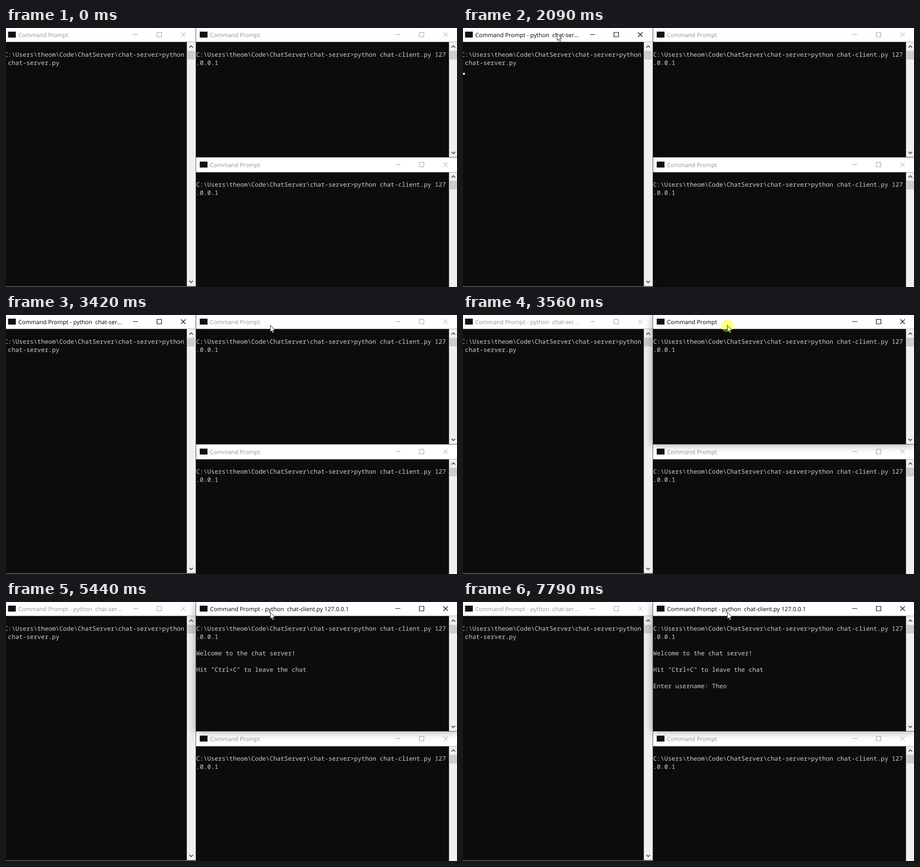
Recreate the animation shown at these times as an HTML page. Size 987x568 px, loop 8 s.

```html
<!DOCTYPE html>
<html lang="en">
<head>
<meta charset="utf-8">
<title>Chat server demo</title>
<style>
  html, body { margin: 0; width: 100%; height: 100%; overflow: hidden; }
  #scene { position: fixed; left: 0; top: 0; width: 100%; height: 100%; overflow: hidden; contain: strict; background: #505050; }
  svg { position: absolute; left: 0; top: 0; display: block; }
  text { white-space: pre; text-rendering: geometricPrecision; }
  .term { font: 500 13.4px "Noto Sans Mono", monospace; fill: #d0d0d0; }
  .title { font: 12.7px "Open Sans", sans-serif; fill: #939393; }
  .buttons { fill: none; stroke: #999; stroke-width: 1; }
  .active .title { fill: #000; }
  .active .buttons { stroke: #000; stroke-width: 1.2; }
  .chevron { fill: none; stroke: #505050; stroke-width: 1.8; }
  .shade { position: absolute; }
  #leftShade { left: 0; top: 0; width: 415px; height: 568px; box-shadow: 0 0 18px rgba(0, 0, 0, .15); }
  #topShade { left: 415px; top: 0; width: 572px; height: 284px; box-shadow: 0 1px 18px rgba(0, 0, 0, .35); }
</style>
</head>
<body>
<div id="scene">
  <svg id="stage" width="987" height="568"></svg>
  <div class="shade" id="leftShade"></div>
  <div class="shade" id="topShade"></div>
  <svg id="pointer" width="987" height="568">
    <g id="click">
      <circle r="13.5"/>
      <path id="clickDark" d="M-11.2 7.5A13.5 13.5 0 0 0 11.2 7.5Z" fill="#2f861c"/>
    </g>
    <path id="arrow" d="M.5 .5V15.6L3.9 12.3 6.2 17.8 8.5 16.8 6.3 11.4H10.8Z" fill="#fff" stroke="#000" stroke-width=".9" stroke-linejoin="round"/>
  </svg>
</div>
<script>
const LOOP = 8000, CELL = 8.04, ROW = 18;
const PROMPT = 'C:\\Users\\theom\\Code\\ChatServer\\chat-server>python';
const $ = id => document.getElementById(id);

const rect = (x, y, w, h, fill) =>
  `<rect x="${x}" y="${y}" width="${w}" height="${h}" fill="${fill}"/>`;
const chevron = (x, y, dir) =>
  `<path class="chevron" d="M${x - 4} ${y + 2 * dir}l4 ${-4 * dir} 4 ${4 * dir}"/>`;
const line = (x, y, row, str, id = '') =>
  `<text class="term" id="${id}" x="${x}" y="${y + 45 + ROW * row}">${str}</text>`;

// x/r: left and right edge, bar: scrollbar, y: offset of the contents, head/end: client top and bottom
function win({ id, x, r, bar, y, head, end, textX, dx, bx, lines }) {
  const mid = bar + 9.5;
  return `<g id="${id}">
    ${rect(x, y - 1, r - x, head - y + 1, '#fff')}
    ${rect(x, head, r - x, end - head, '#0c0c0c')}
    ${rect(bar, head, r - bar, end - head, '#f0f0f0')}
    ${rect(bar + 1, y + 50, 16.5, 19, '#cdcdcd')}
    ${chevron(mid, y + 41, 1)}${chevron(mid, end - 9.5, -1)}
    ${rect(dx + 4.5, y + 8, 17, 13, '#111')}
    <text class="title" x="${dx + 27}" y="${y + 20}">Command Prompt</text>
    <path class="buttons" transform="translate(${bx} ${y})"
      d="M278 14.5h11M330.5 9.5h10v10h-10zM383 9.5l10 10m0 -10l-10 10"/>
    ${lines.map((s, i) => line(textX, y, i + 1, s)).join('')}
  </g>`;
}

const right = { x: 416, r: 988, bar: 969.5, textX: 416.3, dx: 419.5, bx: 574,
  lines: [PROMPT + ' chat-client.py 127', '.0.0.1'] };

$('stage').innerHTML =
  win({ id: 'left', x: 0, r: 415, bar: 395.7, y: 0, head: 30.7, end: 566, textX: -3.7, dx: 0, bx: 0,
    lines: [PROMPT, ' chat-server.py'] }) +
  win({ ...right, id: 'bottom', y: 285, head: 316.6, end: 600 }) +
  win({ ...right, id: 'top', y: 0, head: 30.7, end: 283 }) +
  line(416.3, 0, 4, 'Welcome to the chat server!', 'welcome') +
  line(416.3, 0, 6, 'Hit "Ctrl+C" to leave the chat', 'hint') +
  line(416.3, 0, 8, '', 'entry') +
  `<rect id="caret" width="${CELL}" height="4" fill="#f2f2f2"/>`;

// caret: from, to, left edge of the console, column, row
const carets = [
  [1860, 2090, -3.7, 15, 2], [2090, 2400, -3.7, 0, 3], [2940, 3420, -3.7, 0, 3],
  [4030, 4350, 416.3, 6, 2], [4430, 5120, 416.3, 0, 6], [6220, 6380, 416.3, 0, 8],
  [6380, 6930, 416.3, 16, 8], [6930, 7240, 416.3, 17, 8], [7310, 7540, 416.3, 18, 8],
  [7540, 7710, 416.3, 19, 8], [7710, 7790, 416.3, 20, 8]
];
const keys = [6930, 7310, 7540, 7710];
const leftTitle = document.querySelector('#left .title');
const topTitle = document.querySelector('#top .title');

const show = (el, on) => { el.style.visibility = on ? 'visible' : 'hidden'; };
const setText = (el, s) => { if (el.textContent !== s) el.textContent = s; };

function pointerAt(t) {
  if (t < 920) return [205, -40];
  if (t < 1070) return t < 995 ? [202.5, -7] : [204, 5];
  if (t < 2640) return [205.5, 12];
  const p = Math.min(1, (Math.floor((t - 2640) / 76.6) + 1) / 11);
  const ease = 1 - (1 - p ** 1.4) ** 3.5;
  return [205.5 + 372.5 * ease, 12 + 10 * p + 9.4 * Math.sin(Math.PI * p)];
}

function draw(t) {
  const leftOn = t >= 1300 && t < 3560, topOn = t >= 3560;
  $('left').classList.toggle('active', leftOn);
  $('top').classList.toggle('active', topOn);
  show($('leftShade'), leftOn);
  show($('topShade'), topOn);

  setText(leftTitle, 'Command Prompt' + (t >= 2090 ? ' - python  chat-ser...' : ''));
  setText(topTitle, 'Command Prompt' + (t >= 4350 ? ' - python  chat-client.py 127.0.0.1' : ''));
  show($('welcome'), t >= 4430);
  show($('hint'), t >= 5440);
  const typed = keys.filter(k => t >= k).length;
  setText($('entry'), t >= 6380 ? 'Enter username: ' + 'Theo'.slice(0, typed) : '');

  const caret = carets.find(c => t >= c[0] && t < c[1]);
  show($('caret'), caret);
  if (caret) {
    $('caret').setAttribute('x', caret[2] + CELL * caret[3]);
    $('caret').setAttribute('y', 44.5 + ROW * caret[4]);
  }

  const [x, y] = pointerAt(t);
  $('arrow').setAttribute('transform', `translate(${x} ${y})`);
  const first = t >= 1300 && t < 1540, second = t >= 3560 && t < 3730;
  show($('click'), first || second);
  show($('clickDark'), second);
  $('click').setAttribute('transform', first ? 'translate(205.5 12.8)' : 'translate(578.5 23.5)');
  $('click').setAttribute('fill', first ? '#fbf050' : '#ffff80');
  $('arrow').setAttribute('fill', second ? '#ffff9a' : '#fff');
}

const start = performance.now();
function tick() {
  draw((performance.now() - start) % LOOP);
  requestAnimationFrame(tick);
}
tick();
</script>
</body>
</html>
```
